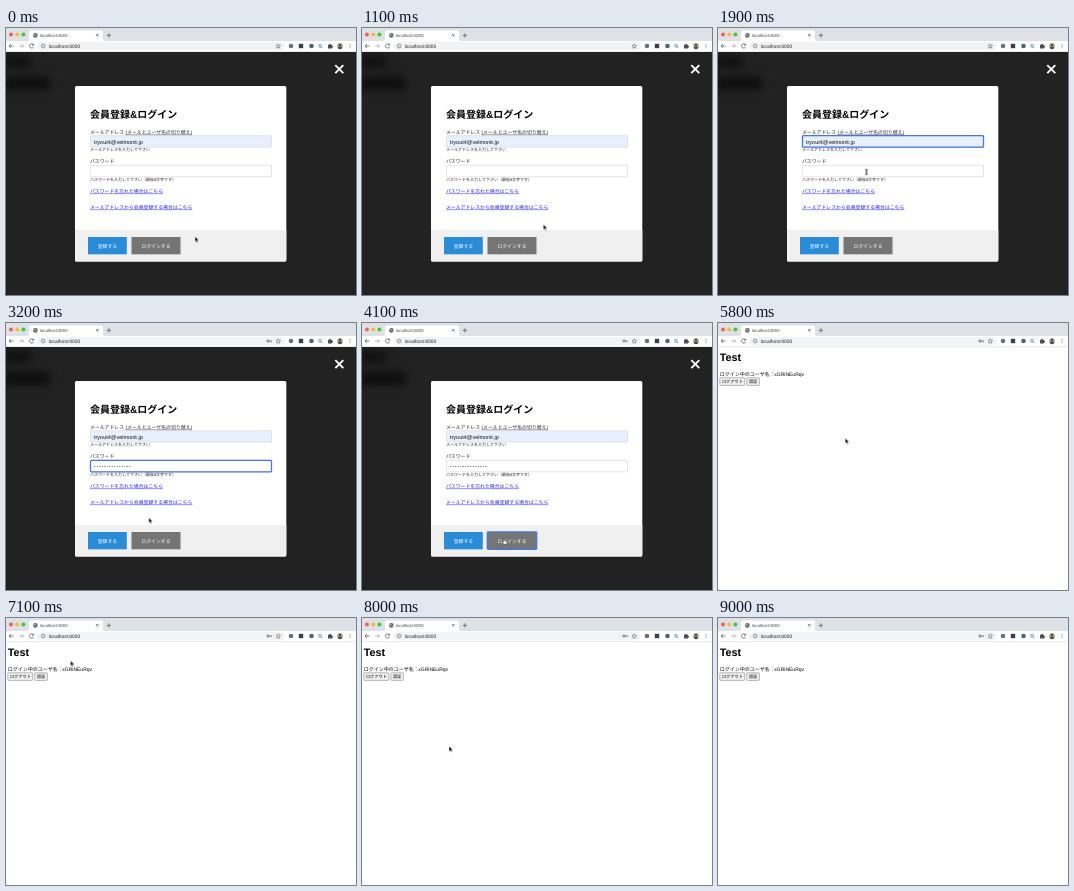
Write an HTML page that moves like this. It is 350 px wide and 267 px high and loops after 9.1 s.

```html
<!DOCTYPE html>
<html lang="ja">
<head>
<meta charset="utf-8">
<title>Login</title>
<style>
html, body { margin: 0; width: 100%; height: 100%; overflow: hidden; background: #fff; }
svg { display: block; width: 350px; height: 267px; }
text {
  font: 4.88px "Liberation Sans", "Noto Sans CJK JP", sans-serif;
  fill: #222;
  text-rendering: geometricPrecision;
}
.h1 { font-size: 10px; font-weight: bold; fill: #000; }
.top { font-size: 10.8px; font-weight: bold; fill: #000; }
.body { font-size: 5px; fill: #000; }
.help { font-size: 4px; }
.value { font-size: 5.5px; fill: #111; }
.native { font-size: 4.2px; fill: #000; }
.tab { font-size: 4.3px; fill: #444; }
.link { fill: #2222ee; text-decoration: underline; }
.swap { text-decoration: underline; }
.on { fill: #fff; }
.icon { fill: none; stroke: #5f6368; stroke-width: .8; }
.ring { fill: none; stroke: #4475e2; stroke-width: 1.3; }
.field { stroke: #d4d4d4; stroke-width: .6; }
.native-box { fill: #efefef; stroke: #777; stroke-width: .5; }

/* One loop is 9100 ms. */
.dialog, .email, .pass, .dots, .key, .press, .arrow, .beam, .hand { animation: 9.1s step-end infinite; }
.dialog { animation-name: dialog; }
.email { animation-name: email; }
.pass { animation-name: pass; }
.dots { animation-name: dots; }
.key { animation-name: key; }
.press { animation-name: press; }
.arrow { animation-name: arrow; }
.beam { animation-name: beam; }
.hand { animation-name: hand; }
.pointer { animation: move 9.1s ease-in-out infinite; }

@keyframes dialog { 0% { opacity: 1 } 48.35%, 100% { opacity: 0 } }
@keyframes email { 0% { opacity: 0 } 19.78% { opacity: 1 } 21.97%, 100% { opacity: 0 } }
@keyframes pass { 0% { opacity: 0 } 21.97% { opacity: 1 } 43.95%, 100% { opacity: 0 } }
@keyframes dots { 0% { opacity: 0 } 27.47%, 100% { opacity: 1 } }
@keyframes key { 0% { opacity: 0 } 28.57%, 100% { opacity: 1 } }
@keyframes press { 0% { opacity: 0 } 43.95%, 100% { opacity: 1 } }
@keyframes arrow {
  0% { opacity: 1 } 18.68% { opacity: 0 }
  34.06% { opacity: 1 } 37.36% { opacity: 0 }
  48.35%, 100% { opacity: 1 }
}
@keyframes beam {
  0% { opacity: 0 } 18.68% { opacity: 1 } 27.47% { opacity: 0 }
  32.96% { opacity: 1 } 34.06%, 100% { opacity: 0 }
}
@keyframes hand { 0% { opacity: 0 } 37.36% { opacity: 1 } 48.35%, 100% { opacity: 0 } }
@keyframes move {
  0%, 8.79% { transform: translate(189px, 208.5px) }
  19.78%, 32.42% { transform: translate(148.5px, 144px) }
  35.16% { transform: translate(142.7px, 194.6px) }
  39.56%, 54.4% { transform: translate(141.6px, 216px) }
  59.34%, 62.09% { transform: translate(128px, 129px) }
  68.13%, 73.08% { transform: translate(123px, 40px) }
  74.73%, 78.57% { transform: translate(64.5px, 42.6px) }
  80.22%, 84.07% { transform: translate(69px, 47.5px) }
  93.4%, 100% { transform: translate(120px, 276px) }
}
</style>
</head>
<body>
<svg viewBox="0 0 350 267">
  <defs>
    <filter id="soft" x="-50%" y="-100%" width="200%" height="300%"><feGaussianBlur stdDeviation="4"/></filter>
    <clipPath id="view"><path d="M0 24H350V267H0Z"/></clipPath>
  </defs>
  <rect width="350" height="267" fill="#fff"/>

  <!-- browser bar -->
  <rect width="350" height="13" fill="#dee1e6"/>
  <circle cx="5" cy="6.6" r="2" fill="#f35f57"/>
  <circle cx="11.2" cy="6.6" r="2" fill="#f6bd3b"/>
  <circle cx="17.4" cy="6.6" r="2" fill="#43c645"/>
  <path d="M21 13.2Q23 13 23 11V4.5Q23 2.5 25 2.5H95Q97 2.5 97 4.5V11Q97 13 99 13.2Z" fill="#fff"/>
  <circle cx="29.4" cy="7.4" r="2.3" fill="#5f6368"/>
  <path d="M28 6.2l1.2.6-.4 1M30.2 8.6l.9-1.2" stroke="#fff" stroke-width=".6" fill="none"/>
  <text class="tab" x="34" y="9">localhost:8000</text>
  <path class="icon" d="M90 6l2.6 2.6M92.6 6L90 8.600M100.800 7.400H105M102.900 5.300V9.500"/>
  <path class="icon" d="M7.500 18H3M5 16L3 18L5 20"/>
  <path class="icon" style="stroke:#a9acb0" d="M13 18H17.500M15.500 16L17.500 18L15.500 20"/>
  <path class="icon" d="M27.300 16.800A2.100 2.100 0 1 0 27.600 18.600M27.600 15.600V17.100H26"/>
  <rect x="31" y="13.900" width="248" height="8.400" rx="4.200" fill="#f1f3f4"/>
  <circle class="icon" cx="37.200" cy="18" r="1.900" style="stroke-width:.6"/>
  <path class="icon" d="M37.200 17.700V19.200M37.200 16.700V17.100" style="stroke-width:.5"/>
  <text x="42.700" y="19.800">localhost:8000</text>
  <g class="key icon">
    <circle cx="262" cy="18" r="1.100"/>
    <path d="M263.100 18H265.400V19.200"/>
  </g>
  <path class="icon" style="stroke-width:.6" d="M272.300 15.800l.7 1.500 1.600.2-1.200 1.100.3 1.600-1.400-.8-1.400.8.3-1.600-1.200-1.100 1.600-.2Z"/>
  <circle cx="285" cy="18" r="2.300" fill="#66717d"/>
  <rect x="292.800" y="15.800" width="4.400" height="4.400" fill="#3c4043"/>
  <circle cx="305.500" cy="18" r="2.300" fill="#4b6572"/>
  <circle cx="314" cy="17.700" r="1.400" fill="none" stroke="#4b85b7" stroke-width=".8"/>
  <path d="M315 18.700l1.300 1.500" stroke="#4b85b7" stroke-width=".9"/>
  <path d="M322 16.800h1.300a.8.8 0 1 1 1.500 0h1.200v1.100a.8.800 0 1 1 0 1.500v1.100h-4Z" fill="#4b4f54"/>
  <circle cx="334" cy="18" r="3" fill="#b0aaa2"/>
  <path d="M331.800 20a2.300 2 0 0 1 4.400 0a3 3 0 0 1-4.400 0Z" fill="#4d4944"/>
  <circle cx="334" cy="17" r="1.200" fill="#4d4944"/>
  <g fill="#5f6368">
    <circle cx="344" cy="16.300" r=".5"/><circle cx="344" cy="18" r=".5"/><circle cx="344" cy="19.700" r=".5"/>
  </g>
  <path d="M0 23.700H350" stroke="#d5d7da" stroke-width=".6"/>

  <!-- page after login -->
  <text class="top" x="1.800" y="37.800">Test</text>
  <text class="body" x="1.800" y="53">ログイン中のユーザ名：</text>
  <text class="body" x="56.300" y="53">xGRiNEuRqv</text>
  <rect class="native-box" x="1.800" y="54.800" width="25" height="7.600" rx=".8"/>
  <text class="native" x="3.900" y="60.200">ログアウト</text>
  <rect class="native-box" x="28.800" y="54.800" width="12.600" height="7.600" rx=".8"/>
  <text class="native" x="30.900" y="60.200">認証</text>

  <!-- sign-in dialog -->
  <g class="dialog">
    <rect y="24" width="350" height="243" fill="#222"/>
    <g clip-path="url(#view)"><g filter="url(#soft)" fill="#000" opacity=".6">
      <rect x="-2" y="29" width="27" height="10"/>
      <rect x="-2" y="49" width="46" height="13"/>
    </g></g>
    <path d="M329.300 37.200l8 8M337.300 37.200l-8 8" stroke="#fff" stroke-width="1.900"/>
    <rect x="69" y="58" width="211.300" height="175.600" rx="1.500" fill="#fff"/>
    <path d="M69 202H280.300V232.100Q280.300 233.600 278.800 233.600H70.500Q69 233.600 69 232.100Z" fill="#f0f0f0"/>

    <text class="h1" x="84" y="90">会員登録&amp;ログイン</text>
    <text x="84" y="105.700">メールアドレス <tspan class="swap">(メールとユーザ名の切り替え)</tspan></text>
    <rect class="field" x="84.500" y="107.700" width="181" height="11.500" rx=".6" fill="#e8f0fe"/>
    <text class="value" x="88" y="115.500">tryout4@velmonit.jp</text>
    <rect class="ring email" x="84.500" y="107.700" width="181" height="11.500" rx="1"/>
    <text class="help" x="84" y="123.300">メールアドレスを入力して下さい</text>

    <text x="84" y="135">パスワード</text>
    <rect class="field" x="84.500" y="137.300" width="181" height="11.500" rx=".6" fill="#fff"/>
    <path class="dots" d="M88.800 143.400H124.500" stroke="#222" stroke-width=".95" stroke-linecap="round" stroke-dasharray="0 2.500"/>
    <rect class="ring pass" x="84.500" y="137.300" width="181" height="11.500" rx="1"/>
    <text class="help" x="84" y="153">パスワードを入力して下さい（最低8文字です）</text>
    <text class="link" x="84" y="164.600">パスワードを忘れた場合はこちら</text>
    <text class="link" x="84" y="180.600">メールアドレスから会員登録する場合はこちら</text>

    <rect x="82" y="209" width="38.800" height="17.300" fill="#2a8bd6"/>
    <text class="on" x="91.700" y="219.500">登録する</text>
    <rect x="125.500" y="209" width="49" height="17.300" fill="#757575"/>
    <text class="on" x="135.300" y="219.500">ログインする</text>
    <rect class="ring press" x="125.300" y="208.900" width="49.400" height="17.500" rx=".8"/>
  </g>

  <g class="pointer">
    <path class="arrow" d="M0 0V5.400L1.300 4.300L2.100 6.200L3.100 5.800L2.300 3.900H4Z" fill="#000" stroke="#fff" stroke-width=".5"/>
    <path class="beam" d="M-1.200 -2.800Q0 -2.800 0 -2V2Q0 2.800 -1.200 2.800M1.200 -2.800Q0 -2.800 0 -2V2Q0 2.800 1.200 2.800" fill="none" stroke="#222" stroke-width=".7"/>
    <path class="hand" d="M-.3 -.2Q.3 -.7 .8 0V1.800L3 2.200Q3.800 2.400 3.600 3.400L3 5.400H.3L-1.400 3.300Q-1.400 2.400 -.3 3Z" fill="#fff" stroke="#111" stroke-width=".5"/>
  </g>
</svg>
</body>
</html>
```
